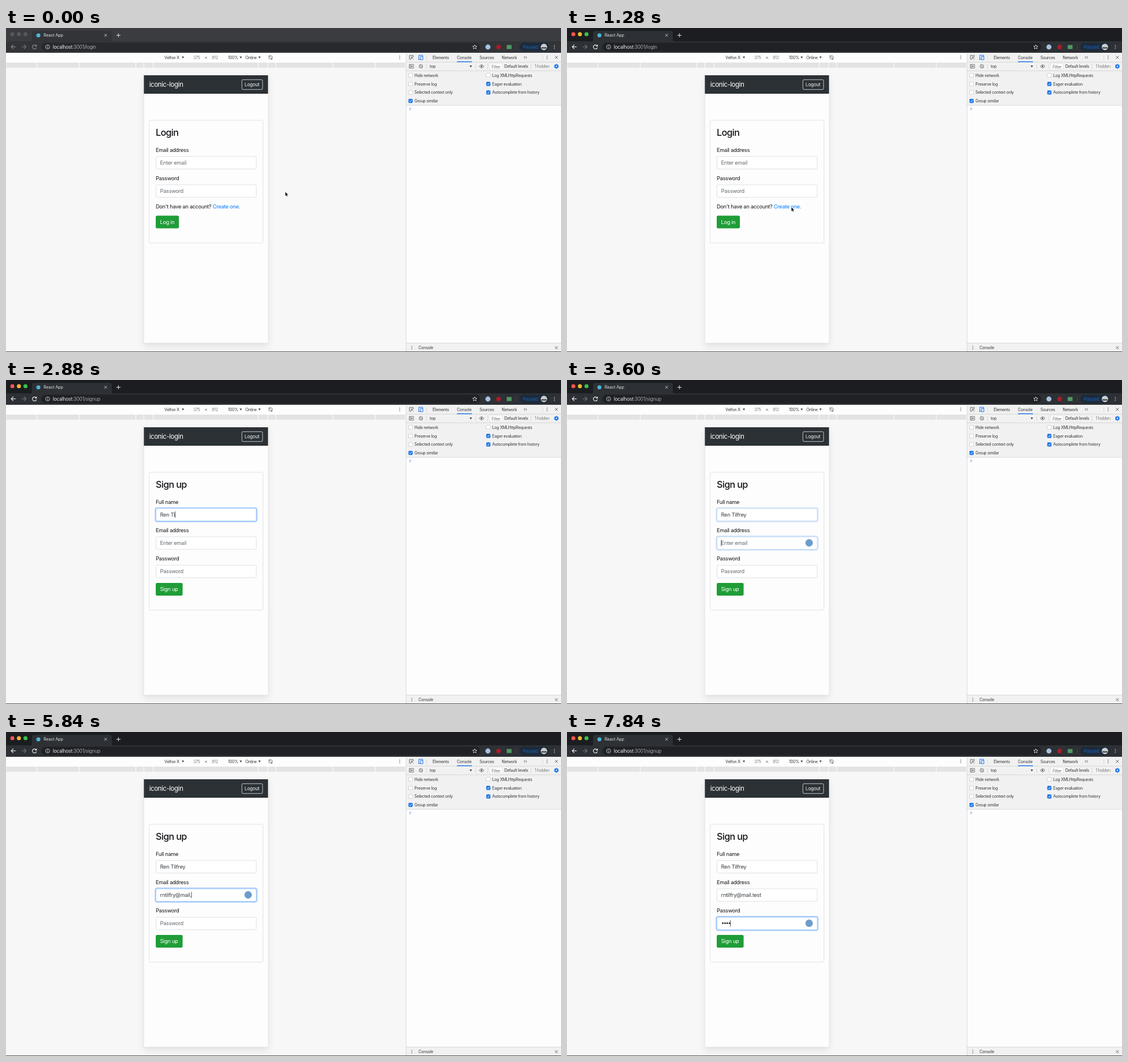
An HTML page that plays this animation: 960 px wide and 562 px high, repeating every 8000 ms.

```html
<!DOCTYPE html>
<html lang="en">
<head>
<meta charset="utf-8">
<title>Sign up flow</title>
<style>
  html, body { margin: 0; width: 100%; height: 100%; overflow: hidden; background: #f7f7f7; }
  svg { display: block; width: 960px; height: 562px; }
  text { font-family: Inter, "Open Sans", sans-serif; letter-spacing: -.028em; white-space: pre; }
  .large { letter-spacing: -.038em; }
  .secret { letter-spacing: -.193em; font-size: 10.5px; }
  .phone { filter: drop-shadow(0 0 .6px rgba(0, 0, 0, .2)) drop-shadow(0 5px 6px rgba(0, 0, 0, .09)); }
</style>
</head>
<body>
<svg id="stage" viewBox="0 0 960 562"></svg>
<script>
const LOOP = 8000, SIGNUP_AT = 1440, ACTIVE_AT = 720;
const INK = '#121417', GREY = '#5a5d61', BLUE = '#1a73e8';

// Markup helpers
const text = (x, y, size, str, fill = '#303135', more = '') =>
  `<text x="${x}" y="${y}" font-size="${size}" fill="${fill}" ${more}>${str}</text>`;
const rect = (x, y, w, h, fill, more = '') =>
  `<rect x="${x}" y="${y}" width="${w}" height="${h}" fill="${fill}" ${more}/>`;
const disc = (x, y, r, fill, more = '') =>
  `<circle cx="${x}" cy="${y}" r="${r}" fill="${fill}" ${more}/>`;
const line = (d, stroke = GREY, w = 1, more = '') =>
  `<path d="${d}" fill="none" stroke="${stroke}" stroke-width="${w}" ${more}/>`;
const caretDown = (x, y) => `<path d="M${x - 2} ${y - 1.6}h4l-2 3.6z" fill="#404246"/>`;
const kebab = (x, y, fill = GREY) => [-2.6, 0, 2.6].map(d => disc(x, y + d, .75, fill)).join('');
const cross = (x, y, r, stroke, w = 1) =>
  line(`M${x - r} ${y - r}l${2 * r} ${2 * r}M${x + r} ${y - r}l${-2 * r} ${2 * r}`, stroke, w);
const ui = (x, y, str, fill) => text(x, y + 2.5, 6.88, str, fill);

function browserBar() {
  return rect(0, 0, 960, 24, '#1d1f22', 'id="strip"') +
    '<path id="tab" d="M41 24q4 0 4-4V9q0-4 4-4H179q4 0 4 4v11q0 4 4 4z"/>' +
    rect(0, 23, 960, 20, '#2d3034', 'id="bar"') +
    [11, 22.3, 33.7].map(x => disc(x, 10.8, 3.5, '', 'class="light"')).join('') +
    disc(56, 12.7, 3.5, '#4ab5d2') +
    text(65, 15.3, 7.3, 'React App', '#dcdee0') +
    cross(172.3, 12.6, 2.2, '#c8cacc') + line('M191 12.6h7M194.5 9.1v7', '#c8cacc', 1.1) +
    '<g id="nav">' +
      line('M16.6 32.7H9M12.7 29l-3.7 3.7 3.7 3.7', 'currentColor', 1.2) +
      line('M52.2 31.2a3.5 3.5 0 1 0 .4 2.4M52.7 28.9v2.6h-2.6', 'currentColor', 1.2) +
    '</g>' +
    line('M27 32.7h7.6M31 29l3.7 3.7-3.7 3.7', '#75787c', 1.1) +
    rect(61, 25.6, 759, 14.6, '#202225', 'id="pill" rx="7.3"') +
    disc(72, 32.8, 3.5, 'none', 'stroke="#d0d2d5" stroke-width=".9"') + line('M72 32.2v2.5M72 30.6v.9', '#d0d2d5', .9) +
    text(81, 35.8, 8.4, '<tspan fill="#e9eaec">localhost</tspan>:3001/<tspan id="path"></tspan>', '#a7aaae') +
    line('M810.8 29l1.1 2.5 2.7.2-2.1 1.8.7 2.7-2.4-1.4-2.4 1.4.7-2.7-2.1-1.8 2.7-.2z', '#d5d7d9', .9) +
    disc(833.6, 33, 4.4, '#a5c3e2') + disc(852, 33, 4, '#a81c2b') + rect(866, 29.5, 8.5, 7, '#4f9862') +
    line('M882.5 28v10', '#45484d', .6) +
    rect(888, 25.6, 51, 14.6, '#1d2a3a', 'rx="7.3"') + text(894, 35.7, 7.8, 'Paused', '#1c62bd') +
    disc(930.5, 32.9, 5.6, '#c6d0d4') + line('M926 34.5h9', '#4c4a40', 2.4) +
    kebab(948.5, 32.8, '#dcdee0');
}

function deviceBar() {
  const stops = [0, 53.5, 126.5, 224.5, 238.5, 254.5, 436.5, 452.5, 466.5, 565.5, 638.5, 691];
  return rect(0, 43, 692, 26, '#fdfdfd') +
    ui(274, 51, 'Velfon X') + caretDown(306, 51) +
    ui(324, 51, '375', '#777') + cross(346, 51.5, 1.6, '#555', .8) + ui(356, 51, '812', '#777') +
    ui(384, 51, '100%') + caretDown(406, 51) + ui(414, 51, 'Online') + caretDown(438.5, 51) +
    disc(457.6, 51, 3.1, 'none', `stroke="${GREY}" stroke-width=".8"`) +
    line('M455.5 48.8l4.3 4.4M454.5 48.5l1.5-1M459 54.8l1.8-.8', GREY, .9) +
    kebab(681, 51) +
    stops.slice(1).map((x, i) => rect(stops[i] + .5, 60, x - stops[i] - 1, 8.8, '#e3e3e3')).join('');
}

function check(x, y, label, on) {
  return rect(x, y - 3.3, 6.6, 6.6, on ? BLUE : '#fff', `rx="1.2" stroke="${on ? BLUE : '#b9b9b9'}" stroke-width=".6"`) +
    (on ? line(`M${x + 1.5} ${y}l1.4 1.5 2.3-3.1`, '#fff', 1) : '') + ui(x + 10, y, label);
}

function devTools() {
  const tabs = [[738, 'Elements'], [780, 'Console'], [819, 'Sources'], [857.5, 'Network']];
  const teeth = [...Array(8)].map((_, i) =>
    `<path d="M952 62.4v2" stroke="${BLUE}" stroke-width="1.7" transform="rotate(${i * 45} 952 66.5)"/>`).join('');
  return rect(692, 43, 268, 519, '#fdfdfd') + rect(692, 43, 268, 91, '#f1f1f1') +
    rect(692, 546.5, 268, 15.5, '#f1f1f1') +
    line('M692 43V562M692 59.2H960M692 74.2H960M692 134.2H960M692 546.5H960', '#cbcbcb', .7) +
    line('M704.5 50v-2.3h-6.6v6.4h3M701 50.3l4 4M701 50.3v3.2M701 50.3h3.2', GREY, .9) +
    line('M714 54.5v-7.2h6.8v2M716.8 49.6h4.3v5.4h-4.3zM713 54.5h3.4', BLUE, 1) +
    line('M727.5 47v9', '#ccc', .6) +
    tabs.map(([x, s]) => ui(x, 51, s)).join('') + rect(780, 57.8, 26, 1.4, BLUE) +
    line('M895.8 49l2 2-2 2M898.8 49l2 2-2 2', GREY, .9) +
    line('M928.5 47v9', '#ccc', .6) + kebab(936, 51) + cross(952, 51, 2.4, GREY, .9) +
    line('M697.5 63.3h7.5v6.3h-7.5zM699.6 63.3v6.3', GREY, .8) + `<path d="M701 64.7v3.6l2.6-1.8z" fill="${GREY}"/>` +
    disc(717.6, 66.5, 3, 'none', `stroke="${GREY}"`) + line('M715.5 64.4l4.2 4.2') +
    line('M727.5 62v9M812.5 62v9M833.5 62v9M908 62v9', '#ccc', .6) +
    ui(733, 66.5, 'top') + caretDown(804, 66.5) +
    line('M818.6 66.5q4-5.4 8 0q-4 5.4-8 0z', GREY, .9) + disc(822.6, 66.5, 1.4, GREY) +
    rect(837, 62, 21, 9.5, '#fff', 'stroke="#ddd" stroke-width=".5"') + ui(840, 67, 'Filter', '#666') +
    ui(862, 66.5, 'Default levels') + ui(914.5, 66.5, '1 hidden', '#777') +
    disc(952, 66.5, 2.2, 'none', `stroke="${BLUE}" stroke-width="1.8"`) + teeth +
    check(696.5, 82, 'Hide network') + check(831, 82, 'Log XMLHttpRequests') +
    check(696.5, 97, 'Preserve log') + check(831, 97, 'Eager evaluation', true) +
    check(696.5, 111.8, 'Selected context only') + check(831, 111.8, 'Autocomplete from history', true) +
    check(696.5, 126.5, 'Group similar', true) +
    line('M698 138.3l2.2 2-2.2 2', '#3b7de0', 1) +
    kebab(702, 554.5) + ui(713.5, 554.3, 'Console') + cross(952, 554.5, 2.4, GREY, .9);
}

const label = (y, s) => text(259, y, 9.17, s, INK);
const button = (y, w, s) => rect(259, y, w, 22, '#1f9d37', 'rx="2.3"') + text(266.5, y + 14.4, 9.17, s, '#fff');

function field(i) {
  const y = 222.6 + i * 49.2;
  return `<g class="field">${rect(258.1, y - 1, 176, 24.2, 'none', 'rx="3.2" stroke="#1070f4" stroke-width="1.9"')}` +
    rect(259.3, y + .2, 173.6, 21.8, '#fff', 'rx="2.3" stroke-width=".7"') +
    text(266.6, y + 14.4, 9.17, '') + '</g>';
}

function phone() {
  return rect(238.5, 82, 214.7, 464.4, '#fdfdfd', 'class="phone"') +
    rect(238.5, 82, 214.7, 32, '#2b3135') + text(247.7, 102, 11.47, 'iconic-login', '#fff', 'class="large"') +
    rect(408, 89.7, 35.8, 17, 'none', 'rx="1.8" stroke="#e8e9ea" stroke-width=".8"') +
    text(412.8, 101.2, 8.1, 'Logout', '#f5f5f5') +
    rect(247.5, 160, 197, 213, '#fdfdfd', 'id="card" rx="2.3" stroke="#dcdcdc" stroke-width=".8"') +
    text(259, 187.4, 16.05, '', INK, 'id="heading" class="large" font-weight="500"') +
    [0, 1, 2].map(field).join('') +
    '<g id="login">' + label(214.8, 'Email address') + label(264, 'Password') +
      label(313.2, `Don't have an account? <tspan fill="#007bff">Create one.</tspan>`) + button(325.5, 40, 'Log in') + '</g>' +
    '<g id="signup">' + label(214.8, 'Full name') + label(264, 'Email address') +
      label(313.2, 'Password') + button(352, 46.5, 'Sign up') + '</g>' +
    disc(418.8, 0, 6.4, '#6c9cca', 'id="badge"') + rect(0, 0, .7, 11, '#111', 'id="caret"');
}

const stage = document.getElementById('stage');
stage.innerHTML = rect(0, 43, 960, 519, '#f7f7f7') + phone() + deviceBar() + devTools() + browserBar() +
  rect(0, 561.2, 960, .8, '#333') +
  '<path id="pointer" d="M0 0V9.2L2.1 7.3 3.5 10.4 5 9.7 3.7 6.7H6.5Z" fill="#000" stroke="#fff" stroke-width=".7"/>';
const $ = id => document.getElementById(id);
const lights = stage.querySelectorAll('.light');
const fields = [...stage.querySelectorAll('.field')].map(g => [...g.children]);

// Key presses as [time, number of characters]
const keys = (start, step, count, typed = 0) =>
  [...Array(count)].map((_, i) => [start + step * i, typed + i + 1]);
const form = [
  { hint: 'Enter full name', value: 'Ren Tilfrey', keys: keys(2400, 94, 11), on: 2190, off: 3525 },
  { hint: 'Enter email', value: 'rntilfry@mail.test',
    keys: [...keys(3840, 120, 6), ...keys(4640, 168, 11, 6), [6640, 18]], on: 3525, off: 6725 },
  { hint: 'Password', value: '••••', keys: keys(7360, 160, 4), on: 6725, off: LOOP },
];
const loginHints = ['Enter email', 'Password'];
const route = [[0, 483, 284], [520, 465, 358], [1280, 388, 310.5], [1440, 388, 310.5],
  [2160, 305.7, 236.3], [LOOP, 305.7, 236.3]];

const clamp = v => Math.max(0, Math.min(1, v));
const ease = v => v * v * (3 - 2 * v);
const mix = (a, b, p) => `rgb(${a.map((v, i) => Math.round(v + (b[i] - v) * p))})`;
const show = (el, on) => el.setAttribute('visibility', on ? 'visible' : 'hidden');

function drawWindow(t) {
  const active = t >= ACTIVE_AT;
  const paint = (id, on, off) => $(id).setAttribute('fill', active ? on : off);
  paint('strip', '#1b1d20', '#3a3c40');
  paint('tab', '#2d3034', '#323438');
  paint('bar', '#2d3034', '#323438');
  paint('pill', '#1f2124', '#27292c');
  $('nav').setAttribute('color', active ? '#e6e7e9' : '#85888c');
  ['#f4564e', '#f5b62f', '#38c149'].forEach((c, i) => lights[i].setAttribute('fill', active ? c : '#56585c'));
}

function drawForm(t) {
  const signup = t >= SIGNUP_AT;
  show($('login'), !signup);
  show($('signup'), signup);
  $('card').setAttribute('height', signup ? 239.3 : 213);
  $('heading').textContent = signup ? 'Sign up' : 'Login';
  $('path').textContent = signup ? 'signup' : 'login';
  show($('caret'), false);
  show($('badge'), false);
  form.forEach((f, i) => {
    const [ring, box, label] = fields[i];
    const focus = ease(clamp((t - f.on) / 150)) - ease(clamp((t - f.off) / 150));
    const last = f.keys.filter(k => k[0] <= t).pop() || [f.on, 0];
    const typed = f.value.slice(0, last[1]);
    [ring, box, label].forEach(el => show(el, signup || i < 2));
    ring.setAttribute('stroke-opacity', .32 * focus);
    box.setAttribute('stroke', mix([206, 211, 216], [118, 180, 252], focus));
    label.textContent = typed || (signup ? f.hint : loginHints[i] || '');
    label.setAttribute('fill', typed ? '#383e44' : '#646a70');
    label.setAttribute('class', typed && i === 2 ? 'secret' : '');
    if (t < f.on || t >= f.off) return;
    const y = 233.5 + i * 49.2;
    show($('caret'), (t - last[0]) % 1000 < 500);
    $('caret').setAttribute('x', 266.5 + (typed ? label.getComputedTextLength() : 0));
    $('caret').setAttribute('y', y - 5.5);
    show($('badge'), i > 0);
    $('badge').setAttribute('cy', y - .2);
  });
}

function drawPointer(t) {
  const i = route.findIndex(k => k[0] > t);
  const [t0, x0, y0] = route[i - 1], [t1, x1, y1] = route[i];
  const p = ease((t - t0) / (t1 - t0));
  show($('pointer'), t < 2400);
  $('pointer').setAttribute('transform', `translate(${x0 + (x1 - x0) * p} ${y0 + (y1 - y0) * p}) scale(.85)`);
}

const start = performance.now();
function frame() {
  const t = (performance.now() - start) % LOOP;
  drawWindow(t);
  drawForm(t);
  drawPointer(t);
  requestAnimationFrame(frame);
}
frame();
</script>
</body>
</html>
```
